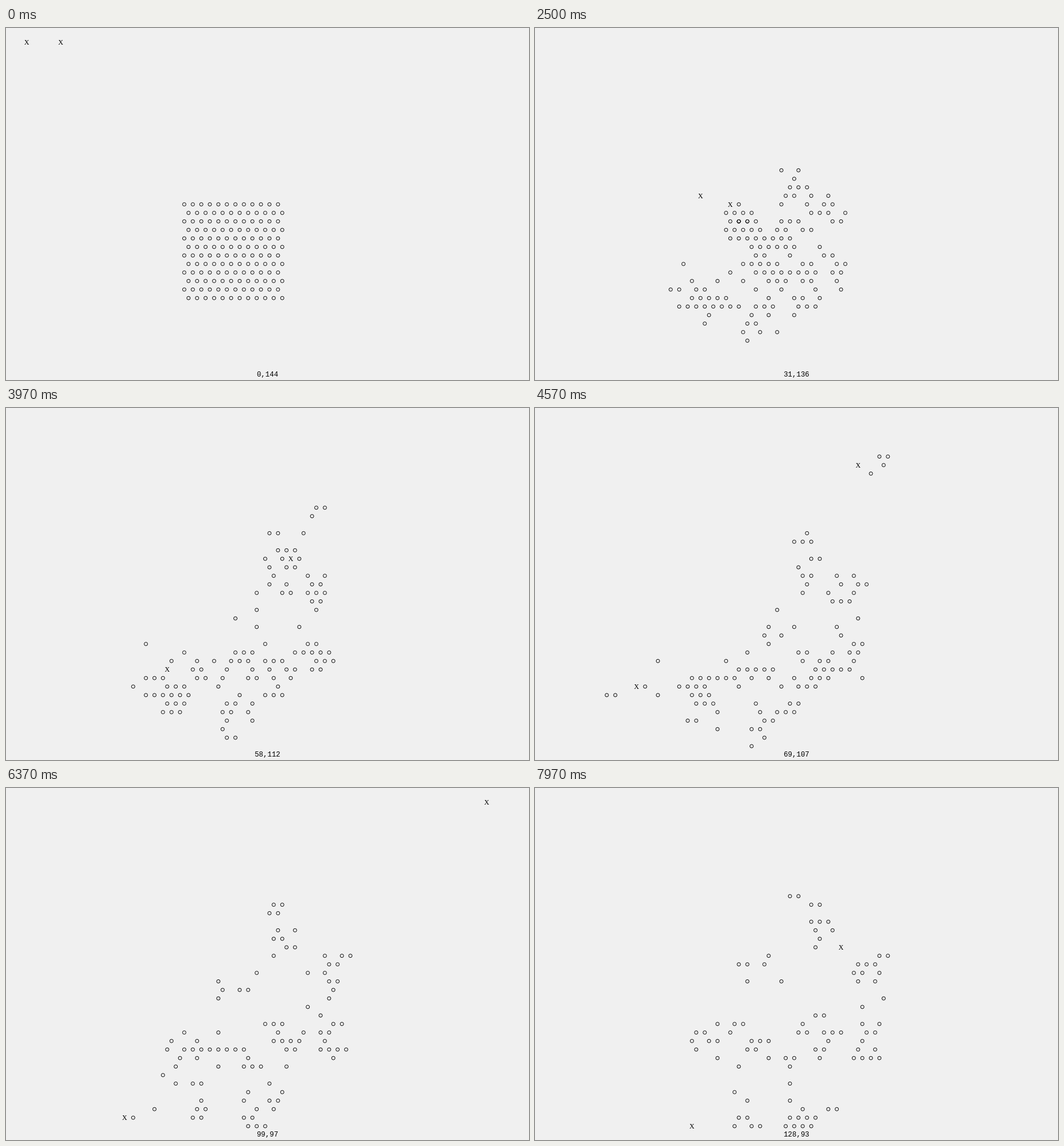
Recreate the animation shown at these times as an HTML page. Size 911 by 614 pixels, loop 8 s.

```html
<!DOCTYPE html>
<html lang="en">
<head>
<meta charset="utf-8">
<title>Hunters and prey</title>
<style>
html, body { margin: 0; width: 100%; height: 100%; overflow: hidden; background: #f0f0f0; }
svg { display: block; width: 911px; height: 614px; }
text { text-anchor: middle; fill: #000; }
.hunter { font: 12px "Liberation Serif", serif; }
.count { font: 12.4px "Liberation Mono", monospace; }
</style>
</head>
<body>
<svg viewBox="0 0 911 614">
  <path id="prey" fill="none" stroke="#000" stroke-width="1"/>
  <text class="hunter">X</text>
  <text class="hunter">X</text>
  <text class="count" x="455.5" y="608"></text>
</svg>
<script>
const LOOP = 8000, END = 128, SETTLED = 47, CHASE = 25;
const SIDE = 12, TOP = 20, LEFT = 41;
const NEAR = [[2, 0], [1, 1], [-1, 1], [-2, 0], [-1, -1], [1, -1]];

// [display slot, tick]
const CLOCK = [[-1, 0], [0, 1], [11, 9], [17, 16], [43, 47], [61, 69], [74, 84], [88, 99], [112, END]];

// [tick, prey alive]
const ALIVE = [[0, 144], [24, 144], [47, 117], [69, 107], [84, 100], [99, 97], [END, 93]];

// Turning points of both hunters: [tick, column, row]
const PATHS = [
  [[0, 4, 1], [8, 12, 9], [16, 25, 12], [47, 52, 27], [69, 23, 32], [84, 4, 35], [99, 27, 38], [END, 36, 39]],
  [[0, 12, 1], [16, 31, 14], [47, 58, 27], [69, 75, 6], [84, 97, 0], [95, 118, 1], [99, 112, 1], [END, 71, 18]]
];

// Each herd drifts between two places: [column, row, column, row]
const HERDS = [
  [59, 15, 60, 12], [59, 19, 64, 15], [55, 23, 53, 18], [54, 27, 46, 20], [30, 24, 22, 24],
  [41, 31, 40, 28], [38, 33, 52, 37], [50, 33, 62, 37], [55, 32, 54, 31], [64, 30, 66, 28],
  [69, 22, 77, 22], [70, 29, 76, 30]
];

let seed = 41;
const random = () => (seed = seed * 16807 % 2147483647) / 2147483647;
const lerp = (a, b, f) => a + (b - a) * f;
const mix = (a, b, f) => [lerp(a[0], b[0], f), lerp(a[1], b[1], f)];
const clamp = (v, lo, hi) => Math.min(hi, Math.max(lo, v));
const dist = (a, b) => ((a[0] - b[0]) / 2) ** 2 + (a[1] - b[1]) ** 2;
const px = k => 6.3 + 7.42 * k;
const py = r => 10.4 + 14.86 * r;

// Nearest lattice cell; column and row have opposite parity
function cell([k, r]) {
  r = clamp(Math.round(r), 0, 39);
  const odd = r % 2 ? 0 : 1;
  return [clamp(odd + 2 * Math.round((k - odd) / 2), odd, 118 + odd), r];
}

const beside = c => NEAR.map(n => [c[0] + n[0], c[1] + n[1]]);

function along(knots, x) {
  const i = Math.max(1, knots.findIndex(p => p[0] >= x));
  const a = knots[i - 1], b = knots[i], f = (x - a[0]) / (b[0] - a[0]);
  return a.slice(1).map((v, j) => lerp(v, b[j + 1], f));
}

const hunterAt = (h, tick) => cell(along(PATHS[h], tick));

// A thin, branching cluster around a centre
function cluster(size, centre, used) {
  const cells = [];
  while (cells.length < size) {
    const from = cells.length ? cells[Math.floor(random() * cells.length)] : centre;
    const c = cell(beside(from)[Math.floor(random() * 6)]);
    const crowd = beside(c).filter(n => used.has(String(n))).length;
    if (used.has(String(c)) || crowd > 2 && random() < .95) continue;
    used.add(String(c));
    cells.push(c);
  }
  return cells;
}

// Give each prey a seat in a herd; swap until the total way is short
function seatAll(prey) {
  const used = new Set();
  prey.forEach((p, i) => p.herd = HERDS[i % HERDS.length]);
  for (const herd of HERDS) {
    const members = prey.filter(p => p.herd === herd);
    cluster(members.length, cell(herd), used).forEach((c, i) => members[i].seat = c);
  }
  for (let better = true; better;) {
    better = false;
    for (const p of prey) for (const q of prey) {
      const gain = dist(p.home, p.seat) + dist(q.home, q.seat) - dist(p.home, q.seat) - dist(q.home, p.seat);
      if (gain < 1e-6) continue;
      [p.seat, q.seat] = [q.seat, p.seat];
      [p.herd, q.herd] = [q.herd, p.herd];
      better = true;
    }
  }
}

// Outer prey leave the block first, then drift with the herd
function graze(p, tick) {
  const f = clamp((tick - p.leave) / (SETTLED - p.leave), 0, 1) ** .6;
  const [k0, r0, k1, r1] = p.herd, drift = Math.max(0, (tick - SETTLED) / (END - SETTLED));
  const [k, r] = mix(p.home, [p.seat[0] + (k1 - k0) * drift, p.seat[1] + (r1 - r0) * drift], f);
  const sway = Math.min(1, 3 * f);
  return [k + 1.3 * sway * Math.sin(tick * .31 + p.phase), r + .7 * sway * Math.sin(tick * .23 + 2 * p.phase)];
}

// Hunted prey run just ahead of the hunter until it catches up
function position(p, tick) {
  const at = graze(p, tick);
  if (p.hunter === undefined) return at;
  const lead = hunterAt(p.hunter, Math.min(p.dies, tick + p.lead));
  return mix(at, lead, clamp((tick - p.dies + CHASE) / (CHASE - 9), 0, 1));
}

function makePrey() {
  const prey = Array.from({ length: SIDE * SIDE }, (_, i) => {
    const col = i % SIDE, row = Math.floor(i / SIDE);
    const depth = Math.min(col, row, SIDE - 1 - col, SIDE - 1 - row);
    return {
      home: [LEFT + row % 2 + 2 * col, TOP + row], leave: depth * 6 + random() * 14,
      phase: random() * 6.28, lead: 3 + Math.floor(random() * 4), dies: Infinity
    };
  });
  seatAll(prey);
  let alive = prey.length;
  for (let tick = 1; tick <= END; tick++) {
    const start = Math.max(0, tick - CHASE);
    for (const n = Math.ceil(along(ALIVE, tick)[0] - 1e-6); alive > n; alive--) {
      let best = { d: Infinity };
      for (const p of prey) for (const h of [0, 1]) {
        const d = dist(graze(p, start), hunterAt(h, start));
        if (p.dies > END && d < best.d) best = { d, p, h };
      }
      best.p.dies = tick;
      best.p.hunter = best.h;
    }
  }
  return prey;
}

function place(c, used) {
  const spot = [c, ...beside(c).map(cell)].find(s => !used.has(String(s))) || c;
  used.add(String(spot));
  return spot;
}

const herd = makePrey();
const states = Array.from({ length: END + 1 }, (_, tick) => {
  const hunters = [0, 1].map(h => hunterAt(h, tick));
  const used = new Set(hunters.map(String));
  const prey = herd.filter(p => p.dies > tick).map(p => place(cell(position(p, tick)), used));
  return { hunters, prey };
});

const dots = document.getElementById("prey");
const marks = document.querySelectorAll(".hunter");
const label = document.querySelector(".count");
const ring = ([k, r]) => `M${(px(k) - 3).toFixed(1)} ${py(r).toFixed(1)}a3 3 0 1 0 6 0a3 3 0 1 0-6 0`;
let shown = -1;

function draw(ms) {
  const slot = clamp(Math.floor((Math.floor(ms / 10) * 10 - 500) * 3 / 200), -1, 112);
  const tick = Math.floor(along(CLOCK, slot)[0] + 1e-6);
  if (tick === shown) return;
  shown = tick;
  const { hunters, prey } = states[tick];
  dots.setAttribute("d", prey.map(ring).join(""));
  hunters.forEach(([k, r], i) => {
    marks[i].setAttribute("x", px(k));
    marks[i].setAttribute("y", py(r) + 4);
  });
  label.textContent = `${tick},${prey.length}`;
}

const begin = performance.now();
function loop() {
  draw((performance.now() - begin) % LOOP);
  requestAnimationFrame(loop);
}
draw(0);
requestAnimationFrame(loop);
</script>
</body>
</html>
```
